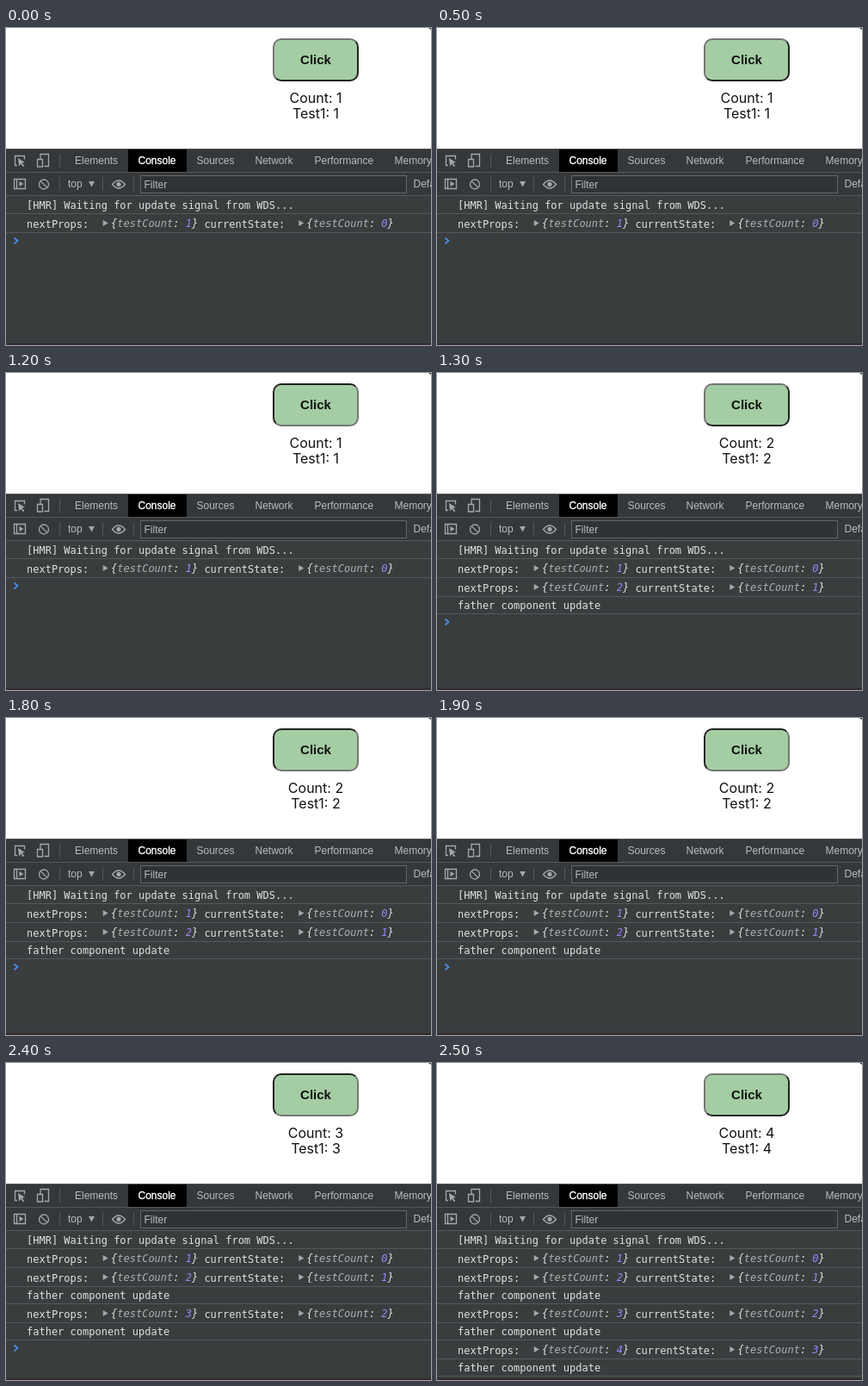
These frames come from a looping animation (494x368 px, 3.2 s). An HTML page:

```html
<!DOCTYPE html>
<html lang="en">
<head>
<meta charset="utf-8">
<title>Click counter with console</title>
<style>
  html, body { margin: 0; width: 100%; height: 100%; overflow: hidden; background: #fff; }
  svg { position: absolute; left: 0; top: 0; display: block; }
  text { white-space: pre; }
  .ui { font: 12px "Liberation Sans", Arial, sans-serif; fill: #b9bcbe; }
  .count { font: 16px Inter, sans-serif; fill: #111; text-anchor: middle; }
  .log { font: 12px "DejaVu Sans Mono", Menlo, monospace; fill: #e0e2e3; }
  .preview { font-style: italic; }
  .key { fill: #adb0b2; }
  .num { fill: #9a84f5; }
  .icon { fill: none; stroke: #a5a8aa; stroke-width: 1.3; }
  .solid { fill: #a5a8aa; }
  .rule { fill: #54585a; }
  #button {
    position: absolute; left: 310px; top: 12px; width: 100px; height: 50px;
    box-sizing: border-box; border: 2px outset #767676; border-radius: 10px;
    background: #a4cda3; color: #111; text-align: center;
    font: bold 15px/46px "Liberation Sans", Arial, sans-serif;
  }
  #button.down { border-style: inset; }
</style>
</head>
<body>
<svg id="stage" width="494" height="368" viewBox="0 0 494 368">
  <path d="M491 0h3v2z" fill="#333"/>
  <text id="count" class="count" x="360" y="87"></text>
  <text id="test" class="count" x="360" y="105"></text>

  <rect y="140" width="494" height="228" fill="#393d3e"/>
  <rect y="140" width="494" height="55" fill="#35383a"/>
  <rect class="rule" y="140" width="494" height="1"/>
  <rect x="142" y="141" width="68" height="26" fill="#000"/>
  <rect class="rule" y="167" width="494" height="1"/>
  <rect class="rule" y="194" width="494" height="1"/>
  <rect y="366" width="494" height="2" fill="#32282d"/>

  <!-- tab bar -->
  <g class="icon">
    <path d="M13 159.5h-2.5v-11h11v4"/>
    <path d="M40 152v-5.500h9.500v14h-5M36.500 152.500h6v8.500h-6z"/>
  </g>
  <path class="solid" d="M14 151l8 5-3.500.7 2.800 3.400-1.300 1.100-2.800-3.400-2 2.700z"/>
  <g id="tabs" class="ui"></g>

  <!-- console toolbar -->
  <g class="icon">
    <path d="M9.500 175.500h13v11h-13zM12.500 175.500v11"/>
    <circle cx="44" cy="181.500" r="5.500"/>
    <path d="M40.200 177.600l7.600 7.800"/>
    <path d="M123.500 181.500q7.500-9 15 0q-7.500 9-15 0z"/>
  </g>
  <path class="solid" d="M15.500 178l5 3-5 3zM96 178h7l-3.500 6.500z"/>
  <circle class="solid" cx="131" cy="181.300" r="2.600"/>
  <g class="rule">
    <rect x="62" y="146" width="1" height="16"/>
    <rect x="62" y="173" width="1" height="16"/>
    <rect x="112" y="173" width="1" height="16"/>
    <rect x="148" y="173" width="1" height="16"/>
  </g>
  <rect x="156.500" y="171.500" width="309" height="20" fill="#303335" stroke="#63676a"/>
  <g class="ui">
    <text x="72" y="185">top</text>
    <text x="160.500" y="186">Filter</text>
    <text x="473.500" y="185">Default levels</text>
  </g>

  <g id="rows"></g>
  <path id="prompt" d="M9.500 -3.500l4 3.500-4 3.500" fill="none" stroke="#4a8cf0" stroke-width="1.700"/>
</svg>
<div id="button">Click</div>

<script>
const LOOP = 3200;
const CLICKS = [[1100, 1300], [1800, 2000], [2300, 2500]]; // press, release
const NS = "http://www.w3.org/2000/svg";
const $ = id => document.getElementById(id);

function add(parent, tag, attrs, text = "") {
  const node = document.createElementNS(NS, tag);
  for (const name in attrs) node.setAttribute(name, attrs[name]);
  node.textContent = text;
  parent.append(node);
  return node;
}

const tabs = [["Elements", 80], ["Console", 153.5], ["Sources", 221.5],
  ["Network", 289.5], ["Performance", 358.5], ["Memory", 451.5]];
for (const [label, x] of tabs) {
  const tab = add($("tabs"), "text", { x, y: 158 }, label);
  if (label === "Console") tab.setAttribute("style", "fill:#fff;stroke:#fff;stroke-width:.35px");
}

// Console rows are stacked; each remembers the y of its bottom rule.
let bottom = 195;
const rows = [];

function addRow(height) {
  bottom += height;
  const row = add($("rows"), "g", {});
  add(row, "rect", { class: "rule", y: bottom, width: 494, height: 1 });
  rows.push({ row, bottom });
  return row;
}

function addMessage(text) {
  const row = addRow(20);
  add(row, "text", { class: "log", x: 24, y: bottom - 5 }, text);
}

function addObject(row, label, x, value) {
  add(row, "text", { class: "log", x, y: bottom - 5 }, label);
  const start = x + label.length * 7.224;
  const arrow = start + (label.length > 11 ? 16 : 16.5);
  add(row, "path", { class: "solid", d: `M${arrow} ${bottom - 14}l6 3.5-6 3.500z` });
  const preview = add(row, "text", { class: "log preview", x: arrow + 9.3, y: bottom - 6 });
  add(preview, "tspan", {}, "{");
  add(preview, "tspan", { class: "key" }, "testCount");
  add(preview, "tspan", {}, ": ");
  add(preview, "tspan", { class: "num" }, value);
  add(preview, "tspan", {}, "}");
}

function addUpdate(count) {
  const row = addRow(22);
  addObject(row, "nextProps:", 24, count);
  addObject(row, "currentState:", 230.4, count - 1);
}

addMessage("[HMR] Waiting for update signal from WDS...");
addUpdate(1);
CLICKS.forEach((_, i) => {
  addUpdate(i + 2);
  addMessage("father component update");
});

function draw(t) {
  const done = CLICKS.filter(([, up]) => t >= up).length;
  const down = CLICKS.some(([press, up]) => t >= press && t < up);
  const shown = 2 + done * 2;

  $("button").classList.toggle("down", down);
  $("count").textContent = `Count: ${done + 1}`;
  $("test").textContent = `Test1: ${done + 1}`;
  rows.forEach(({ row }, i) => row.setAttribute("visibility", i < shown ? "visible" : "hidden"));
  $("prompt").setAttribute("transform", `translate(0 ${rows[shown - 1].bottom + 10})`);
}

function tick() {
  draw(performance.now() % LOOP);
  requestAnimationFrame(tick);
}
tick();
</script>
</body>
</html>
```
